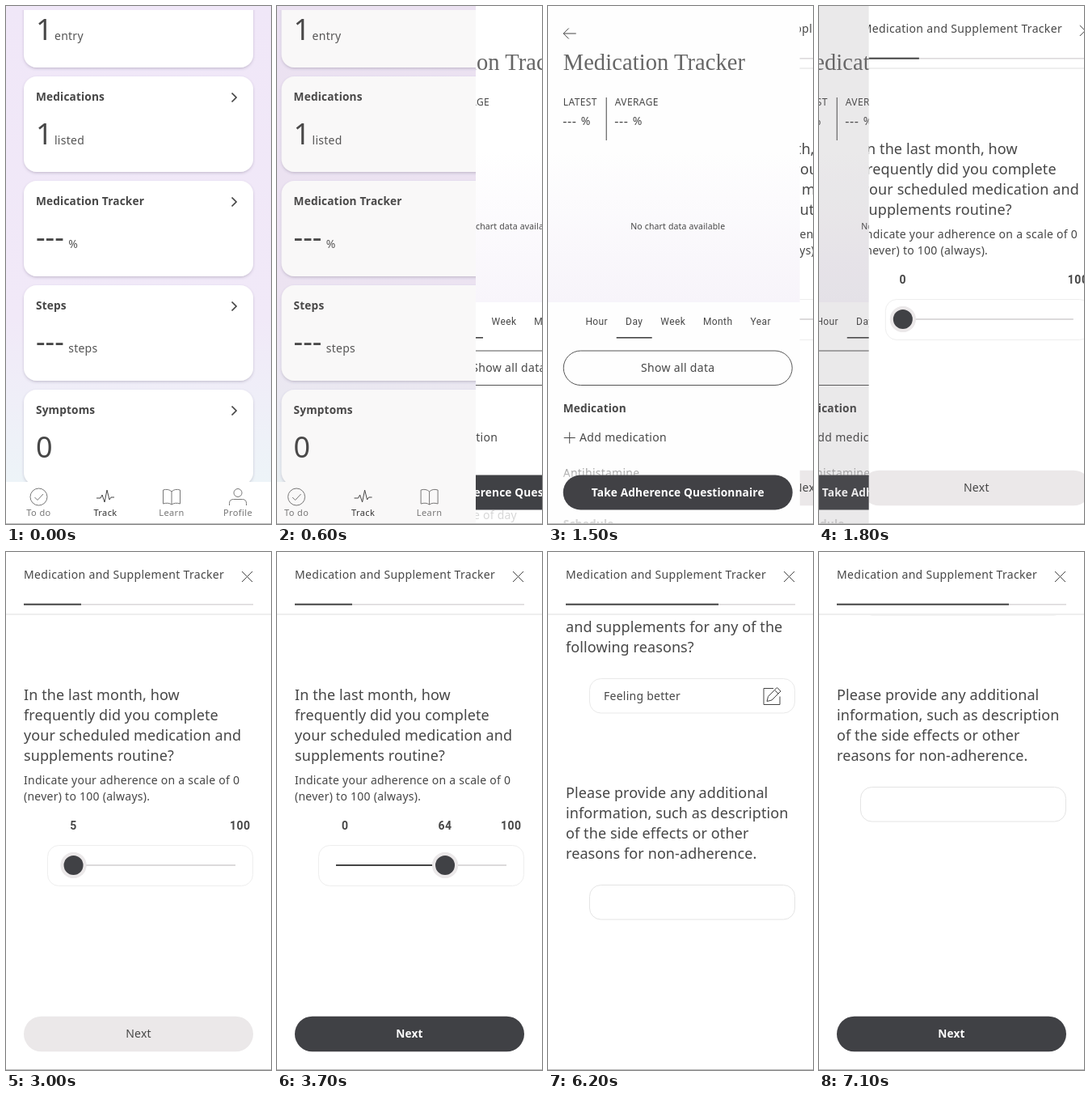
These frames come from a looping animation (328 by 640 pixels, 8 s). An HTML page:

```html
<!DOCTYPE html>
<html lang="en">
<head>
<meta charset="utf-8">
<title>Medication tracker</title>
<style>
  html, body { margin: 0; width: 100%; height: 100%; overflow: hidden; background: #fff; }
  svg { display: block; width: 328px; height: 640px; }
  text { font: 14px "Noto Sans", "Open Sans", sans-serif; letter-spacing: .25px; fill: #474747; white-space: pre; }
  .semi { font-weight: 600; font-size: 13.7px; letter-spacing: .14px; }
  .mid { text-anchor: middle; }
  .wide { letter-spacing: .33px; }
  .unit { fill: #555; }
  .big { font-size: 36px; letter-spacing: 0; }
  .q { font-size: 18px; letter-spacing: .1px; }
  .tab { font-size: 11px; letter-spacing: .4px; fill: #777; }
  .on { fill: #333; font-weight: 500; }
  .cap { font-size: 12px; letter-spacing: .4px; }
  .dash { font-size: 16px; letter-spacing: .6px; }
  .note { font-size: 10.5px; letter-spacing: .15px; }
  .title { font: 28.5px "Liberation Serif", "Times New Roman", serif; letter-spacing: .08px; fill: #666; }
  .range { font: 12px Roboto, sans-serif; letter-spacing: .4px; }
  .num { font: 600 14px Roboto, sans-serif; letter-spacing: .5px; }
  .white { fill: #fff; }
  .line { fill: none; stroke: #444; }
  .icon { fill: none; stroke: #777; }
</style>
</head>
<body>
<svg id="stage" viewBox="0 0 328 640"></svg>
<script>
const W = 328, LOOP = 8000, DARK = '#404145';

const text = (x, y, s, cls = '', more = '') => `<text x="${x}" y="${y}" class="${cls}" ${more}>${s}</text>`;
const lines = (x, y, gap, cls, list) => list.map((s, i) => text(x, y + i * gap, s, cls)).join('');
const rect = (x, y, w, h, fill, more = '') =>
  `<rect x="${x}" y="${y}" width="${w}" height="${h}" fill="${fill}" ${more}/>`;
const path = (d, cls = 'line', more = '') => `<path d="${d}" class="${cls}" ${more}/>`;
const group = (id, body) => `<g id="${id}">${body}</g>`;
const box = (y, h, r, stroke) => rect(51.5, y + .5, 254, h, '#fff', `rx="${r}" stroke="${stroke}"`);
const pill = (y, h, fill, label, cls) =>
  rect(22, y, 284, h, fill, `rx="${h / 2}"`) + text(164, y + h / 2 + 4.8, label, 'mid ' + cls);

// ---- overview list
function card(i, name, value, unit) {
  const y = -42 + 129 * i, dash = value === '---';
  const base = y + (dash ? 83 : 84);
  return rect(22, y, 284, 118, '#fff', 'rx="16" filter="url(#shade)"') +
    text(37, y + 30, name, 'semi') +
    path(`M279.5 ${y + 20.5}l5.5 5.5l-5.5 5.5`, 'line', 'stroke-width="1.7"') +
    text(37, dash ? base - 1 : base, value, 'big') + text(dash ? 77.2 : 60, base, unit, 'unit');
}

const tabs =
  rect(0, 588, W, 52, '#fff') +
  '<circle cx="40.5" cy="606.5" r="10.5" class="icon"/>' +
  path('M35.5 607l3.5 3.5l7-7.5', 'icon') +
  path('M112 608h5l2-4l3 9l3-15l3 12l2-3h4') +
  path('M205 600q-4-4-10.5-2v17q6.500-2 10.500 1q4-3 10.500-1v-17q-6.500-2-10.500 2v16', 'icon') +
  '<circle cx="287" cy="601.5" r="5" class="icon"/>' +
  path('M276.5 617v-2.500q0-5 5-5h11q5 0 5 5v2.500', 'icon') +
  text(40.5, 630, 'To do', 'tab mid') +
  text(123, 630, 'Track', 'tab mid on') +
  text(205, 630, 'Learn', 'tab mid') +
  text(287, 630, 'Profile', 'tab mid');

const list =
  rect(0, 0, W, 640, 'url(#lilac)') +
  `<g clip-path="url(#below)">` +
  card(0, 'Entries', '1', 'entry') +
  card(1, 'Medications', '1', 'listed') +
  card(2, 'Medication Tracker', '---', '%') +
  card(3, 'Steps', '---', 'steps') +
  card(4, 'Symptoms', '0', '') + '</g>' + tabs;

// ---- tracker page
const stat = (x, name) => text(x, 123, name, 'cap') +
  text(x - .5, 147.5, '---', 'dash') + text(x + 22, 147, '%');
const ranges = [['Hour', 63.5], ['Day', 110], ['Week', 158], ['Month', 213.5], ['Year', 266.5]];

const tracker =
  rect(0, 0, W, 640, '#fff') +
  rect(0, 180, W, 186, 'url(#haze)') +
  path('M38 34H22.5M29 27.5l-6.5 6.5l6.5 6.5') +
  text(22, 79, 'Medication Tracker', 'title') +
  stat(22, 'LATEST') + stat(86, 'AVERAGE') +
  path('M75.5 113V166') +
  text(164, 276, 'No chart data available', 'note mid') +
  ranges.map(([s, x]) => text(x, 394, s, 'range mid')).join('') +
  rect(88, 409, 44, 1.6, '#444') +
  rect(22.5, 426, 283, 42.5, '#fff', 'rx="21.25" stroke="#555"') +
  text(164, 452, 'Show all data', 'mid wide') +
  text(22, 502, 'Medication', 'semi') +
  path('M23 533.5H37M30 526.5V540.5') +
  text(42.3, 538, 'Add medication', 'wide') +
  group('early', text(22, 602, 'Schedule', 'semi') +
    '<circle cx="35" cy="629" r="7" class="icon"/>' + text(56, 634, 'Same time of day')) +
  group('late', text(22, 582, 'Antihistamine') + text(22, 645, 'Schedule', 'semi')) +
  rect(0, 550, W, 90, 'url(#fade)') +
  pill(579.5, 43, DARK, 'Take Adherence Questionnaire', 'semi white');

// ---- questionnaire
const reasons = ['Experienced side effects', 'Feeling better', 'Feeling worse',
  'Forgot to take', 'Ran out of supply', 'Other reason/s'];
const Q2 = 306, Q3 = Q2 + 230;

const reply = (y, s) => box(y, 42.5, 14, '#e9e9e9') + text(69, y + 26.5, s) +
  path(`M279 ${y + 12.5}h-12v20h20v-10M271 ${y + 28.5}l1.5-6l11-11l4.5 4.5l-11 11zM280.5 ${y + 14.5}l4.5 4.5`);

const option = (s, i) => {
  const y = Q2 + 261.5 + 51 * i;
  return box(y, 43, 21.5, '#f3f3f3') + text(178.5, y + 26.5, s, 'mid');
};

const slider =
  text(80, 343, '0', 'num', 'id="min"') +
  text(277, 343, '100', 'num') +
  text(73, 343, '0', 'num mid', 'id="value"') +
  box(362, 50, 14, '#eee') +
  rect(73, 386, 211, 2, '#dcdadb') +
  rect(73, 386, 0, 2, '#444', 'id="fill"') +
  group('thumb', `<circle id="glow" r="16" fill="${DARK}" opacity=".1"/>` +
    `<circle r="16" fill="#ebe8e9"/><circle r="12" fill="${DARK}"/>`);

const questions =
  lines(22, 182.5, 25, 'q', ['In the last month, how', 'frequently did you complete',
    'your scheduled medication and', 'supplements routine?']) +
  lines(22, 287, 20, '', ['Indicate your adherence on a scale of 0', '(never) to 100 (always).']) +
  group('slider', slider) +
  group('score', reply(341, '64')) +
  group('second', lines(22, Q2 + 182.5, 25, 'q', ['Did you miss your medications',
    'and supplements for any of the', 'following reasons?']) +
    group('options', reasons.map(option).join('') +
      group('picked', rect(51, Q2 + 312.5, 255, 43.5, DARK, 'rx="21.75"') +
        text(178.5, Q2 + 339, reasons[1], 'mid white'))) +
    group('reason', reply(Q2 + 265, reasons[1]))) +
  group('third', lines(22, Q3 + 182.5, 25, 'q', ['Please provide any additional',
    'information, such as description', 'of the side effects or other',
    'reasons for non-adherence.']) + box(Q3 + 290, 42.5, 14, '#e4e4e4'));

const form =
  rect(0, 0, W, 640, '#fff') +
  group('scroll', questions) +
  group('next', pill(573.7, 43.6, '#ebe8e9', 'Next', '') +
    group('ready', pill(573.7, 43.6, DARK, 'Next', 'semi white'))) +
  rect(0, 0, W, 76, '#fff') + rect(0, 76, W, 2, '#eee') +
  text(22, 33, 'Medication and Supplement Tracker', 'wide') +
  path('M292 24l13 13M305 24l-13 13') +
  rect(22, 64, 284, 1.6, '#dcdadb') + rect(22, 63.7, 71, 2, '#444', 'id="bar"');

const stops = list => list.map(([o, c, a = 1]) =>
  `<stop offset="${o}" stop-color="${c}" stop-opacity="${a}"/>`).join('');
const gradient = (id, list) =>
  `<linearGradient id="${id}" x1="0" y1="0" x2="0" y2="1">${stops(list)}</linearGradient>`;
const clipped = (id, body) =>
  `<clipPath id="${id}Clip"><rect id="${id}Edge" width="${W}" height="640"/></clipPath>` +
  `<g id="${id}Wrap" clip-path="url(#${id}Clip)">${group(id, body)}` +
  rect(0, 0, W, 640, '#776f76', `id="${id}Dim"`) + '</g>';

const stage = document.getElementById('stage');
stage.innerHTML = '<defs>' +
  gradient('lilac', [[0, '#f0e7f8'], [.6, '#f1e9f8'], [.92, '#edf4f8']]) +
  gradient('haze', [[0, '#fff'], [1, '#f8f5fb']]) +
  gradient('fade', [[0, '#fff', 0], [.4, '#fff', .78], [1, '#fff', .78]]) +
  '<clipPath id="below"><rect y="5" width="328" height="640"/></clipPath>' +
  '<filter id="shade" x="-5%" y="-5%" width="110%" height="115%">' +
  '<feDropShadow dx="0" dy="1.5" stdDeviation="1.5" flood-color="#46385a" flood-opacity=".25"/></filter></defs>' +
  group('form', form) + clipped('tracker', tracker) + clipped('list', list) +
  rect(0, 639, W, 1, '#bdbdbd');

// ---- motion: [time, value] steps, each held until the next
const push = [.05, .25, .57, .812, .94, .985, 1];
const run = (start, values) => values.map((v, i) => [start + i * 100, v]);
const tracks = {
  open: [[0, 0], ...run(500, push)],
  ask: [[0, 0], ...run(1500, push.slice(0, 5)), [2000, 1]],
  value: [[0, 0], ...run(3000, [5, 26, 50, 64])],
  glow: [[0, 16], ...run(3100, [30, 36, 36]), [3500, 26], [3600, 16]],
  ready: [[0, 0], ...run(3500, [.35, .75, 1]), [4200, 0], [5600, 1]],
  next: [[0, 1], [4100, .5], [4200, 0], [4500, .5], [4600, 1], [6200, 0], [6500, .5], [6600, 1]],
  drop: [[0, 0], [4200, 8], [4600, 0], [6200, 8], [6600, 0]],
  scroll: [[0, 0], ...run(4100, [.06, .3, .62, .85, .96, 1].map(v => v * Q2)),
    [6200, Q2 + 109], [6300, Q3]],
  bar: [[0, 71], ...run(4100, [74, 92, 115, 131, 139, 142]), [6200, 189], [6300, 213]]
};
const at = (name, t) => tracks[name].filter(s => s[0] <= t).pop()[1];

const el = id => document.getElementById(id);
const set = (id, name, v) => el(id).setAttribute(name, v);
const show = (id, on) => set(id, 'display', on ? 'inline' : 'none');
const move = (id, x, y) => set(id, 'transform', `translate(${x} ${y})`);

function cover(id, p) {
  show(id + 'Wrap', p < 1);
  set(id + 'Edge', 'width', W * (1 - p));
  set(id + 'Dim', 'opacity', .19 * p);
}

function draw(t) {
  const open = at('open', t), ask = at('ask', t), value = at('value', t);
  cover('list', open);
  cover('tracker', ask);
  move('list', -.2 * W * open, 0);
  move('tracker', .5 * W * (1 - open) - .2 * W * ask, 0);
  move('form', .5 * W * (1 - ask), 0);
  show('early', t < 900);
  show('late', t >= 900);

  const x = 2.11 * value;
  move('thumb', 73 + x, 387);
  set('fill', 'width', x);
  set('value', 'x', 73 + x);
  el('value').textContent = value;
  show('min', value > 12);
  set('glow', 'r', at('glow', t));

  show('slider', t < 4100);
  show('score', t >= 4100);
  show('second', t >= 4100);
  show('picked', t >= 5600);
  show('options', t < 6200);
  show('reason', t >= 6200);
  show('third', t >= 6200);
  move('scroll', 0, -at('scroll', t));
  set('bar', 'width', at('bar', t));
  set('next', 'opacity', at('next', t));
  move('next', 0, at('drop', t));
  set('ready', 'opacity', at('ready', t));
}

const t0 = performance.now();
function tick() {
  draw((performance.now() - t0) % LOOP);
  requestAnimationFrame(tick);
}
tick();
</script>
</body>
</html>
```
